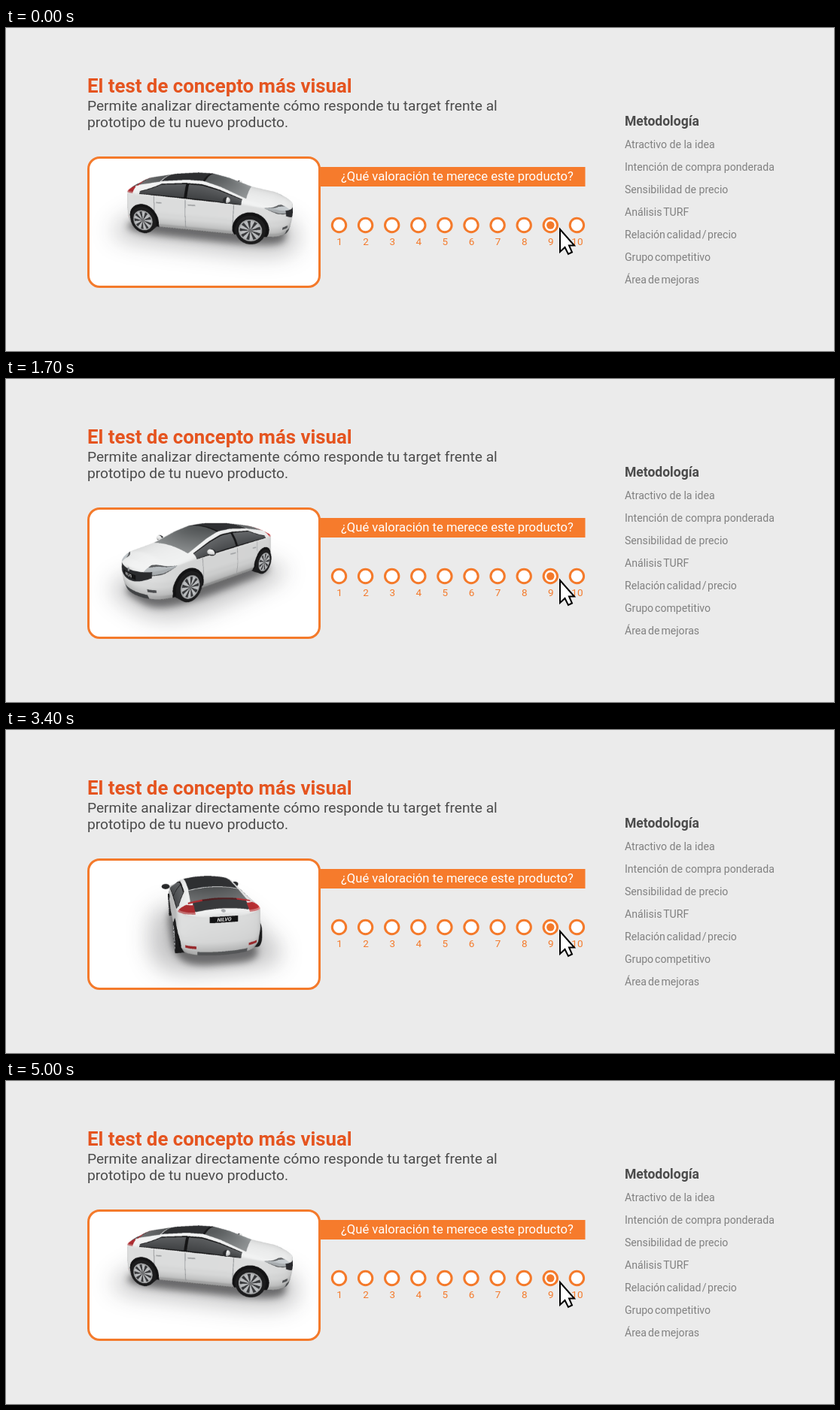
Recreate the animation shown at these times as an HTML page with a canvas. Size 1100x430 px, loop 5.1 s.

```html
<!DOCTYPE html>
<html lang="es">
<head>
<meta charset="utf-8">
<title>Test de concepto</title>
<style>
  html, body { margin: 0; width: 100%; height: 100%; overflow: hidden; background: #ebebeb; }
  #stage { position: absolute; left: 0; top: 0; width: 1100px; height: 430px; overflow: hidden; }
  svg, canvas { position: absolute; display: block; }
  svg { left: 0; top: 0; }
  canvas { left: 111px; top: 174px; }
  text { font-family: Roboto, "Open Sans", sans-serif; }
  .title { font-size: 25.8px; font-weight: 700; fill: #e5541f; }
  .lead { font-size: 19.17px; fill: #4b4b4b; }
  .ask { font-size: 16.6px; fill: #fff; }
  .head { font-size: 17.5px; font-weight: 700; fill: #4b4b4b; }
  .item { font-size: 14.1px; fill: #808080; }
  .tight { word-spacing: -1.5px; }
  .num { font-size: 13.5px; fill: #f47a2b; text-anchor: middle; }
</style>
</head>
<body>
<div id="stage">
  <svg width="1100" height="430">
    <rect x="410" y="185" width="359.5" height="26" fill="#f67b2c"/>
    <rect x="109.5" y="172.5" width="307" height="172" rx="15" fill="#fff" stroke="#f47a2b" stroke-width="3"/>
    <text class="title" x="108" y="86">El test de concepto más visual</text>
    <text class="lead" x="108" y="110">Permite analizar directamente cómo responde tu target frente al</text>
    <text class="lead" x="108" y="132">prototipo de tu nuevo producto.</text>
    <text class="ask" x="445" y="203">¿Qué valoración te merece este producto?</text>
    <text class="head" x="822" y="130">Metodología</text>
    <text class="item" x="822" y="160">Atractivo de la idea</text>
    <text class="item" x="822" y="190">Intención de compra ponderada</text>
    <text class="item" x="822" y="220">Sensibilidad de precio</text>
    <text class="item tight" x="822" y="250">Análisis TURF</text>
    <text class="item tight" x="822" y="280">Relación calidad&#8202;/&#8202;precio</text>
    <text class="item tight" x="822" y="310">Grupo competitivo</text>
    <text class="item tight" x="822" y="340">Área de mejoras</text>
    <g id="scale"></g>
    <path d="M736 268V298L742.5 292L747 301L752 298.5L748 289.5H755Z" fill="#fff" stroke="#000" stroke-width="2"/>
  </svg>
  <canvas id="car" width="304" height="169"></canvas>
</div>
<script>
// Rating scale
let marks = '';
for (let i = 0; i < 10; i++) {
  const x = 442.5 + 35.1 * i;
  marks += `<circle cx="${x}" cy="262.5" r="9.2" fill="#fff" stroke="#f47a2b" stroke-width="3"/>`;
  if (i === 8) marks += `<circle cx="${x}" cy="262.5" r="5.2" fill="#f47a2b"/>`;
  marks += `<text class="num" x="${x + 0.5}" y="289">${i + 1}</text>`;
}
document.getElementById('scale').innerHTML = marks;

// Car model in metres: u forward, v to the right, h up
const FRONT = 1.25, REAR = -1.33, WHEEL = 0.33;
const clamp = (x, a = 0, b = 1) => Math.min(b, Math.max(a, x));
const mix = (a, b, f) => a + (b - a) * f;

function curve(keys) {
  return x => {
    let i = 1;
    while (i < keys.length - 1 && x > keys[i][0]) i++;
    const [x0, y0] = keys[i - 1], [x1, y1] = keys[i];
    return mix(y0, y1, clamp((x - x0) / (x1 - x0)));
  };
}
const topLine = curve([[-2, 1], [-1.92, 1.04], [-1.8, 1.08], [-1.56, 1.18], [-0.9, 1.3],
  [-0.3, 1.36], [0.1, 1.35], [0.5, 1.25], [1.1, 1.03], [1.7, 0.94], [2, 0.85], [2.15, 0.77]]);
const shoulder = curve([[-2, 0.9], [-1.7, 0.97], [0, 0.89], [1.2, 0.86], [1.7, 0.82], [2.15, 0.71]]);
const rail = curve([[-2, 0.6], [-1.8, 0.67], [-1.5, 0.61], [-0.9, 0.58], [0.1, 0.58],
  [1.1, 0.71], [1.8, 0.62], [2.15, 0.4]]);

function halfWidth(u) {
  const x = u > 0 ? clamp((u - 0.9) / 1.25) : clamp(-u - 1);
  return 0.88 * Math.sqrt(1 - Math.pow(x, u > 0 ? 5 : 6));
}

// q runs round the section: floor, sill, flank, shoulder, side glass, roof
function bodyPoint(u, q) {
  const w = halfWidth(u), s = shoulder(u), t = topLine(u);
  const r = Math.min(rail(u), 0.9 * w), edge = Math.max(s + 0.02, t - 0.07);
  const ring = [[0, 0.16], [0.9 * w, 0.16], [0.98 * w, 0.27], [w, 0.55], [0.96 * w, s], [r, edge], [0, t]];
  const i = Math.min(5, Math.floor(q)), f = q - i;
  let v = mix(ring[i][0], ring[i + 1][0], f);
  const h = mix(ring[i][1], ring[i + 1][1], i === 5 ? 1 - (1 - f) * (1 - f) : f);
  if (i === 4) v += 0.04 * w * Math.sin(Math.PI * f);
  const lean = clamp((Math.abs(u) - 1.6) / 0.5) * 0.35 * (h - 0.5) * (h - 0.5);
  return [u - Math.sign(u) * lean, v, h, q];
}

function grid(fn, na, nb, part) {
  const pts = [], at = (i, j) => pts[clamp(i, 0, na)][clamp(j, 0, nb)];
  for (let i = 0; i <= na; i++) {
    pts.push([]);
    for (let j = 0; j <= nb; j++) pts[i].push(fn(i / na, j / nb));
  }
  const rows = pts.map((row, i) => row.map((p, j) => {
    const a = at(i + 1, j), b = at(i - 1, j), c = at(i, j + 1), d = at(i, j - 1);
    const e = [a[0] - b[0], a[1] - b[1], a[2] - b[2]], g = [c[0] - d[0], c[1] - d[1], c[2] - d[2]];
    const n = [e[1] * g[2] - e[2] * g[1], e[2] * g[0] - e[0] * g[2], e[0] * g[1] - e[1] * g[0]];
    const len = Math.hypot(...n);
    return len > 1e-12 ? [...p, n[0] / len, n[1] / len, n[2] / len] : [...p, 0, 1, 0];
  }));
  return { rows, part };
}

const parts = [];
for (const side of [1, -1]) {
  parts.push(grid((a, b) => {
    const p = bodyPoint(0.075 + 2.075 * Math.sin((a - 0.5) * Math.PI), b * 6);
    p[1] *= side;
    return p;
  }, 90, 42, paintBody));
  for (const hub of [FRONT, REAR]) {
    parts.push(grid((a, b) => {
      const ang = a * Math.PI * 2, r = WHEEL * Math.min(1, b / 0.8);
      const v = 0.9 - Math.max(0, b - 0.8) * 1.2;
      return [hub + r * Math.cos(ang), side * v, WHEEL + r * Math.sin(ang), r];
    }, 32, 10, paintWheel));
  }
  parts.push(grid((a, b) => {
    const th = a * Math.PI * 2, ph = b * Math.PI;
    return [0.72 + 0.08 * Math.cos(th) * Math.sin(ph), side * (0.97 + 0.11 * Math.sin(th) * Math.sin(ph)),
      0.99 + 0.07 * Math.cos(ph), 0];
  }, 12, 8, paintMirror));
}

// Paint rules: [r, g, b]; null means white bodywork
const BLACK = [20, 20, 21], DARK = [42, 43, 45], RED = [164, 42, 46], SEAM = [168, 170, 172];

function paintBody(u, v, h, q) {
  const a = Math.abs(v);
  if (q < 1) return BLACK;
  const arch = Math.min(Math.hypot(u - FRONT, h - WHEEL), Math.hypot(u - REAR, h - WHEEL));
  if (a > 0.5 && q < 4 && arch < 0.4) return BLACK;
  if (u > 1.85) {
    if (Math.hypot(v, h - 0.7) < 0.04) return [150, 153, 156];
    if (a < 0.26 && Math.abs(h - 0.585) < 0.05) return BLACK;
    if (a < 0.62 && h > 0.48 + 0.4 * a * a && h < 0.71 + 0.12 * a * a) return [44, 45, 48];
    if (a < 0.5 && h < 0.26) return [70, 72, 74];
    if (a > 0.52 && a < 0.68 && Math.abs(h - 0.36) < 0.03) return [80, 82, 84];
  }
  if (u > 1.5 && a > 0.46) {
    const off = Math.abs(h - 0.74 - 0.2 * (2 - u)), size = 0.07 * clamp((u - 1.5) / 0.3);
    if (off < size * 0.75) return [176, 181, 184];
    if (off < size) return [84, 86, 88];
  }
  if (u < -1.5) {
    if (Math.hypot(v, u + 1.88) < 0.04 && q > 5) return [160, 162, 165];
    if (u < -1.8 && a < 0.27 && Math.abs(h - 0.88) < 0.055) return BLACK;
    if (a > 0.52 && a < 0.72 && u < -1.65 && Math.abs(h - 0.33) < 0.028) return RED;
    if (a < 0.5 && h < 0.24) return [92, 94, 96];
    if (a > 0.52 && u > -1.93 && u < -1.58 && h > 0.97 && h < 1.09) return h > 1 ? RED : [190, 108, 110];
  }
  if (q > 5) {
    const f = 6 - q;
    if (u > 0.08 && u < 1.1 && f < 0.92) {
      const g = 78 + 170 * clamp(1.3 - h, 0, 0.3);
      return u < 0.13 ? BLACK : [g, g + 3, g + 4];
    }
    if (u > -0.95 && u <= 0.08 && f < 0.92) return DARK;
    if (u > -1.53 && u < -0.98 && f < 0.93) {
      const g = 70 + 200 * clamp(1.3 - h, 0, 0.2);
      return [g, g + 2, g + 3];
    }
    if (u > -1.59 && u <= -1.53) return f > 0.55 ? RED : [74, 28, 30];
    if (u > -1.82 && u <= -1.59 && f < 0.84) return [54, 55, 57];
    return null;
  }
  if (q > 4) {
    const high = 4.88 - 0.5 * clamp((-0.9 - u) / 0.5);
    if (u > -1.4 && u < 1.02 && q > 4.06 && q < high) {
      const frame = Math.abs(u + 0.25) < 0.035 || q < 4.12 || q > high - 0.06;
      const g = 62 + 34 * (q - 4);
      return frame ? BLACK : [g, g + 2, g + 4];
    }
    return null;
  }
  if (q > 1.5 && a > 0.7) {
    if ([0.86, -0.25, -1.02].some(x => Math.abs(u - x) < 0.01)) return SEAM;
    if (Math.abs(h - 0.79) < 0.014 && (Math.abs(u + 0.1) < 0.09 || Math.abs(u + 0.9) < 0.07)) return SEAM;
  }
  return null;
}

function paintWheel(u, v, h, r) {
  if (r > 0.255) return [30, 30, 31];
  if (r > 0.225) return [176, 178, 180];
  if (r < 0.045) return [120, 122, 124];
  const ang = Math.atan2(h - WHEEL, u - (u > 0 ? FRONT : REAR));
  return Math.cos(ang * 9) > -0.15 ? [200, 202, 204] : [58, 59, 61];
}

function paintMirror(u, v, h) {
  return u < 0.73 || h < 0.96 ? DARK : null;
}

// Camera and software renderer
const W = 304, H = 169, SS = 3, BW = W * SS, BH = H * SS;
const DIST = 6.9, FOCAL = 345, TILT = 20.5 * Math.PI / 180;
const ce = Math.cos(TILT), se = Math.sin(TILT);
const ctx = document.getElementById('car').getContext('2d');
const buffer = document.createElement('canvas');
buffer.width = BW;
buffer.height = BH;
const bctx = buffer.getContext('2d');
const image = bctx.createImageData(BW, BH);
const depth = new Float32Array(BW * BH);
let cs = 1, sn = 0;
ctx.imageSmoothingQuality = 'high';

function project(u, v, h) {
  const x = u * cs - v * sn, z = u * sn + v * cs;
  const d = DIST - z * ce - h * se, k = FOCAL / d;
  return { x: 154 + k * x, y: 89 + k * (z * se - h * ce), z: 1 / d };
}

function shade(o, part, m) {
  const [u, v, h, q] = m;
  const len = Math.hypot(m[4], m[5], m[6]) || 1;
  let nx = (m[4] * cs - m[5] * sn) / len, nz = (m[4] * sn + m[5] * cs) / len, ny = m[6] / len;
  let facing = ny * se + nz * ce;
  if (facing < 0) { nx = -nx; ny = -ny; nz = -nz; facing = -facing; }
  const rim = Math.pow(1 - Math.min(1, facing), 3);
  const base = part(u, v, h, q);
  const px = image.data;
  let k;
  if (base) {
    k = 0.93 + 0.12 * ny + 0.25 * rim;
    if (part === paintBody && q > 4) k += 0.2 * Math.max(0, nx);
  } else {
    k = 0.86 + 0.13 * ny - 0.03 * nx - 0.32 * rim - 0.16 * clamp((0.45 - h) / 0.3);
    k = clamp(k, 0.35, 1);
  }
  const c = base || [249, 250, 250];
  for (let i = 0; i < 3; i++) px[o * 4 + i] = c[i] * k;
  px[o * 4 + 3] = 255;
}

const m = new Array(7);
function triangle(a, b, c, part) {
  const area = (b.x - a.x) * (c.y - a.y) - (c.x - a.x) * (b.y - a.y);
  if (Math.abs(area) < 1e-7) return;
  const x0 = Math.max(0, Math.floor(Math.min(a.x, b.x, c.x))), x1 = Math.min(BW - 1, Math.ceil(Math.max(a.x, b.x, c.x)));
  const y0 = Math.max(0, Math.floor(Math.min(a.y, b.y, c.y))), y1 = Math.min(BH - 1, Math.ceil(Math.max(a.y, b.y, c.y)));
  for (let y = y0; y <= y1; y++) {
    for (let x = x0; x <= x1; x++) {
      const px = x + 0.5, py = y + 0.5;
      const f = ((px - a.x) * (c.y - a.y) - (c.x - a.x) * (py - a.y)) / area;
      const g = ((b.x - a.x) * (py - a.y) - (px - a.x) * (b.y - a.y)) / area;
      const e = 1 - f - g;
      if (e < -1e-6 || f < -1e-6 || g < -1e-6) continue;
      const o = y * BW + x, z = e * a.z + f * b.z + g * c.z;
      if (z <= depth[o]) continue;
      depth[o] = z;
      for (let i = 0; i < 7; i++) m[i] = e * a.m[i] + f * b.m[i] + g * c.m[i];
      shade(o, part, m);
    }
  }
}

function shadow(long, wide, blur, alpha) {
  ctx.save();
  ctx.filter = `blur(${blur}px)`;
  ctx.fillStyle = `rgba(30,30,32,${alpha})`;
  ctx.beginPath();
  const soft = x => Math.sign(x) * Math.pow(Math.abs(x), 0.5);
  for (let i = 0; i < 48; i++) {
    const t = i / 24 * Math.PI;
    const p = project(long * soft(Math.cos(t)), wide * soft(Math.sin(t)), 0);
    ctx.lineTo(p.x, p.y);
  }
  ctx.fill();
  ctx.restore();
}

function plate(u, h, dir) {
  if (dir * sn < 0.35) return;
  const o = project(u, 0, h), r = project(u, -dir * 0.1, h), d = project(u, 0, h - 0.1);
  ctx.save();
  ctx.transform((r.x - o.x) / 10, (r.y - o.y) / 10, (d.x - o.x) / 10, (d.y - o.y) / 10, o.x, o.y);
  ctx.font = 'italic 700 10px Roboto, sans-serif';
  ctx.textAlign = 'center';
  ctx.textBaseline = 'middle';
  ctx.fillStyle = '#e4e4e4';
  ctx.fillText('NILVO', 0, 0.5);
  ctx.restore();
}

function draw(step) {
  const turn = (15 + 7.2 * step) * Math.PI / 180;
  cs = Math.cos(turn);
  sn = Math.sin(turn);
  depth.fill(0);
  image.data.fill(0);
  for (const { rows, part } of parts) {
    const pts = rows.map(row => row.map(p => {
      const s = project(p[0], p[1], p[2]);
      return { x: s.x * SS, y: s.y * SS, z: s.z, m: p };
    }));
    for (let i = 1; i < pts.length; i++) {
      for (let j = 1; j < pts[i].length; j++) {
        triangle(pts[i - 1][j - 1], pts[i][j - 1], pts[i][j], part);
        triangle(pts[i - 1][j - 1], pts[i][j], pts[i - 1][j], part);
      }
    }
  }
  bctx.putImageData(image, 0, 0);
  ctx.clearRect(0, 0, W, H);
  shadow(2.3, 1.45, 15, 0.26);
  shadow(2.05, 0.95, 5, 0.55);
  ctx.drawImage(buffer, 0, 0, W, H);
  plate(2.15, 0.585, 1);
  plate(-1.96, 0.88, -1);
}

let shown = -1;
const start = performance.now();
function tick() {
  const step = Math.floor((performance.now() - start) / 100) % 51;
  if (step !== shown) draw(shown = step);
  requestAnimationFrame(tick);
}
tick();
</script>
</body>
</html>
```
